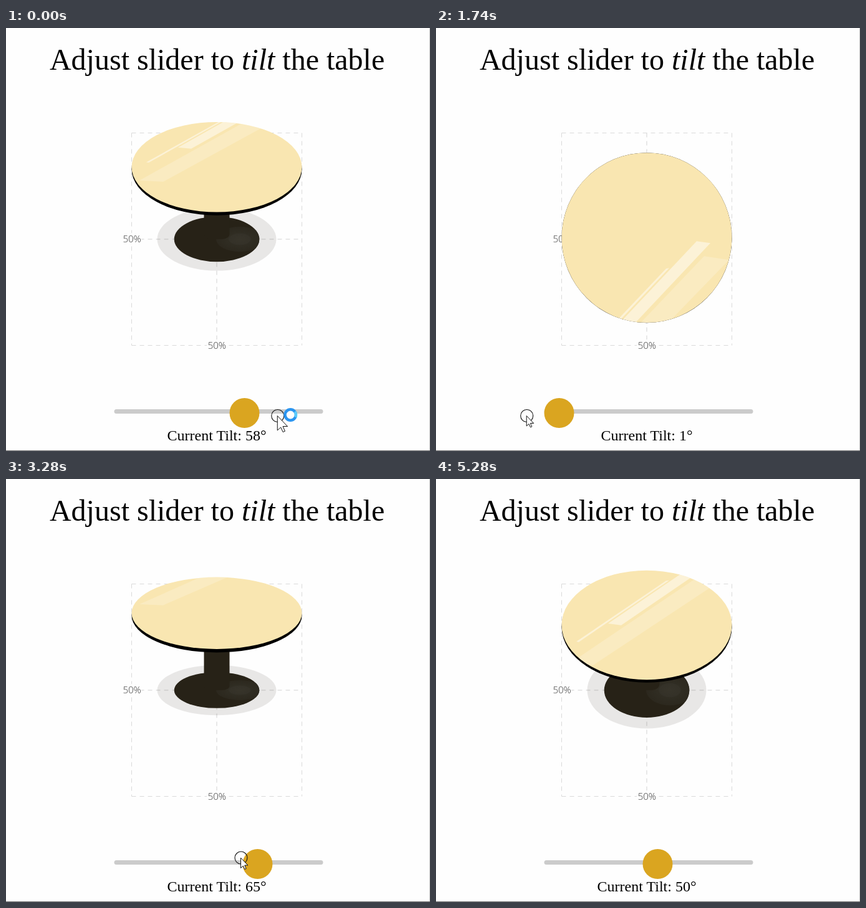
Animation of 680x679 px, one loop 5770 ms. Source, as an HTML page:

```html
<!DOCTYPE html>
<html lang="en">
<head>
<meta charset="utf-8">
<title>Tilting table</title>
<style>
html, body { margin: 0; width: 100%; height: 100%; overflow: hidden; background: #fefefe; }
svg { display: block; width: 100%; height: 100%; }
.serif { font-family: "Liberation Serif", "Times New Roman", serif; text-anchor: middle; }
.mark { font: 300 15px "Open Sans", sans-serif; text-anchor: middle; fill: #3c3c3c; }
.guide { fill: none; stroke: #dadada; stroke-dasharray: 7 6; }
</style>
</head>
<body>
<svg viewBox="0 0 680 679" xmlns="http://www.w3.org/2000/svg">
  <defs>
    <clipPath id="topClip"><ellipse id="clipTop" cx="338" rx="136.5"/></clipPath>
    <clipPath id="baseClip"><circle r="68.3"/></clipPath>
    <radialGradient id="glow">
      <stop offset="0" stop-color="#37342a"/>
      <stop offset=".44" stop-color="#343128"/>
      <stop offset=".48" stop-color="#302d23"/>
      <stop offset="1" stop-color="#2c281e"/>
    </radialGradient>
  </defs>
  <rect width="680" height="679" fill="#fefefe"/>
  <text class="serif" x="338.6" y="67" font-size="48">Adjust slider to <tspan font-style="italic">tilt</tspan> the table</text>

  <g class="guide">
    <path d="M201.5 168.5H474.5M201.5 509.5H474.5M201.5 168.5V509.5M474.5 168.5V509.5"/>
    <path d="M338 168.5V509.5M201.5 339H474.5" stroke="#d2d2d2"/>
  </g>
  <g fill="#fefefe">
    <rect x="186" y="329" width="31" height="20"/>
    <rect x="322" y="500" width="32" height="19"/>
  </g>
  <text class="mark" x="202" y="344">50%</text>
  <text class="mark" x="338.3" y="515">50%</text>

  <g id="floor">
    <circle r="95.5" fill="#272217" fill-opacity=".1"/>
    <circle r="68.3" fill="#272217"/>
    <circle cx="37" r="38" fill="url(#glow)" clip-path="url(#baseClip)"/>
  </g>
  <path id="leg" fill="#272217"/>
  <ellipse id="rim" cx="338" rx="136.5"/>
  <ellipse id="board" cx="338" rx="136.5" fill="#f9e6b1"/>
  <g clip-path="url(#topClip)">
    <g id="shine" fill="#fff">
      <path d="M-124 259L92 32L132 38L-86 263Z" fill-opacity=".2"/>
      <path d="M-62 159L80 8L102 11L-41 163ZM-113 204L31 52L36 51L-109 205Z" fill-opacity=".48"/>
    </g>
  </g>

  <rect x="173.5" y="612" width="335" height="7" rx="3.5" fill="#cbcbcb"/>
  <circle id="thumb" cy="618" r="24" fill="#daa520"/>
  <text id="label" class="serif" x="338" y="662" font-size="24"></text>
  <path d="M679.5 0V679" stroke="#c8c8c8"/>
  <path d="M0 678.5H680" stroke="#6b6b6b"/>

  <g id="cursor">
    <circle id="press" r="10" fill="none" stroke="#111" stroke-width="1.1"/>
    <g id="busy" transform="translate(20.5 -1.5)">
      <circle r="8.7" fill="#fff" stroke="#2b95f0" stroke-width="4.4"/>
      <path id="spin" d="M-8.7 0A8.7 8.7 0 0 1 -4.3 -7.5" fill="none" stroke="#5ccbfa" stroke-width="4.4"/>
    </g>
    <path id="arrow" d="M0 0V16.5L3.8 13L6.3 18.4L8.6 17.4L6.2 12H11.5Z" fill="#fff" stroke="#111" vector-effect="non-scaling-stroke"/>
  </g>
</svg>
<script>
const LOOP = 5770, STEP = 40, LAG = 100, GRAB = 7;
const CX = 338, CY = 339, R = 136.5, LEFT = 197.5, TRAVEL = 287;
const BUSY_END = 880, RELEASE = 4820, LEAVE = 5280;
const $ = id => document.getElementById(id);
const set = (id, attrs) => {
  for (const k in attrs) $(id).setAttribute(k, attrs[k]);
};
const clamp = (v, lo, hi) => Math.max(lo, Math.min(hi, v));

// Turning points of the hand: [time, x, y]
const turns = [
  [-270, 300, 622.5], [70, 451, 622.5], [280, 451, 622.5], [640, 511, 622.5],
  [840, 512, 622.5], [1745, 145, 622.5], [2041, 145, 616], [2902, 424, 607],
  [3740, 313, 609.5], [3960, 348.5, 609.5], [5000, 348.5, 609.5], [LEAVE, 525, 690]
];

// Every stroke swings from one turning point to the next.
function hand(t) {
  const n = turns.findIndex(p => p[0] > t);
  if (n < 0) return turns[turns.length - 1].slice(1);
  const [a, b] = [turns[n - 1], turns[n]];
  const k = (1 - Math.cos(Math.PI * (t - a[0]) / (b[0] - a[0]))) / 2;
  return [1, 2].map(i => a[i] + (b[i] - a[i]) * k);
}

function draw(time) {
  // The opening pose rests for a moment, then the picture advances in steps.
  const t = time < 90 ? 0 : Math.floor(time / STEP) * STEP;
  const [px, py] = hand(t);
  const [grip] = hand(Math.min(t, RELEASE) - LAG);
  const thumb = clamp(grip + GRAB, LEFT, LEFT + TRAVEL);
  const deg = clamp(Math.round((thumb - LEFT) / TRAVEL * 90), 1, 89);
  const rad = deg * Math.PI / 180;
  const s = Math.sin(rad), c = Math.max(Math.cos(rad), .0495);
  const top = CY - R * s, ry = R * c, foot = 16 * c;

  set("floor", { transform: `translate(${CX} ${CY}) scale(1 ${c})` });
  set("leg", { d: `M317.5 ${top}h41V${CY - foot}a12 ${foot} 0 0 1 -12 ${foot}h-17a12 ${foot} 0 0 1 -12 ${-foot}Z` });
  set("rim", { cy: top + 4 * s, ry: ry + 2 * s });
  set("board", { cy: top, ry });
  set("clipTop", { cy: top, ry });
  set("shine", { transform: `translate(${CX} ${CY - 2 * R * s}) scale(1 ${c})` });

  set("thumb", { cx: thumb });
  $("label").textContent = `Current Tilt: ${deg}°`;

  const loading = time < BUSY_END;
  set("cursor", { transform: `translate(${px} ${py})`, visibility: time < LEAVE ? "visible" : "hidden" });
  set("press", { opacity: time < RELEASE ? 1 : 0 });
  set("busy", { opacity: loading ? 1 : 0 });
  set("spin", { transform: `rotate(${(t - 600) * .36})` });
  set("arrow", { transform: `translate(-.5 0) scale(${loading ? 1.42 : 1})` });
}

let start;
function tick(now) {
  if (start === undefined) start = now;
  draw((now - start) % LOOP);
  requestAnimationFrame(tick);
}
draw(0);
requestAnimationFrame(tick);
</script>
</body>
</html>
```
